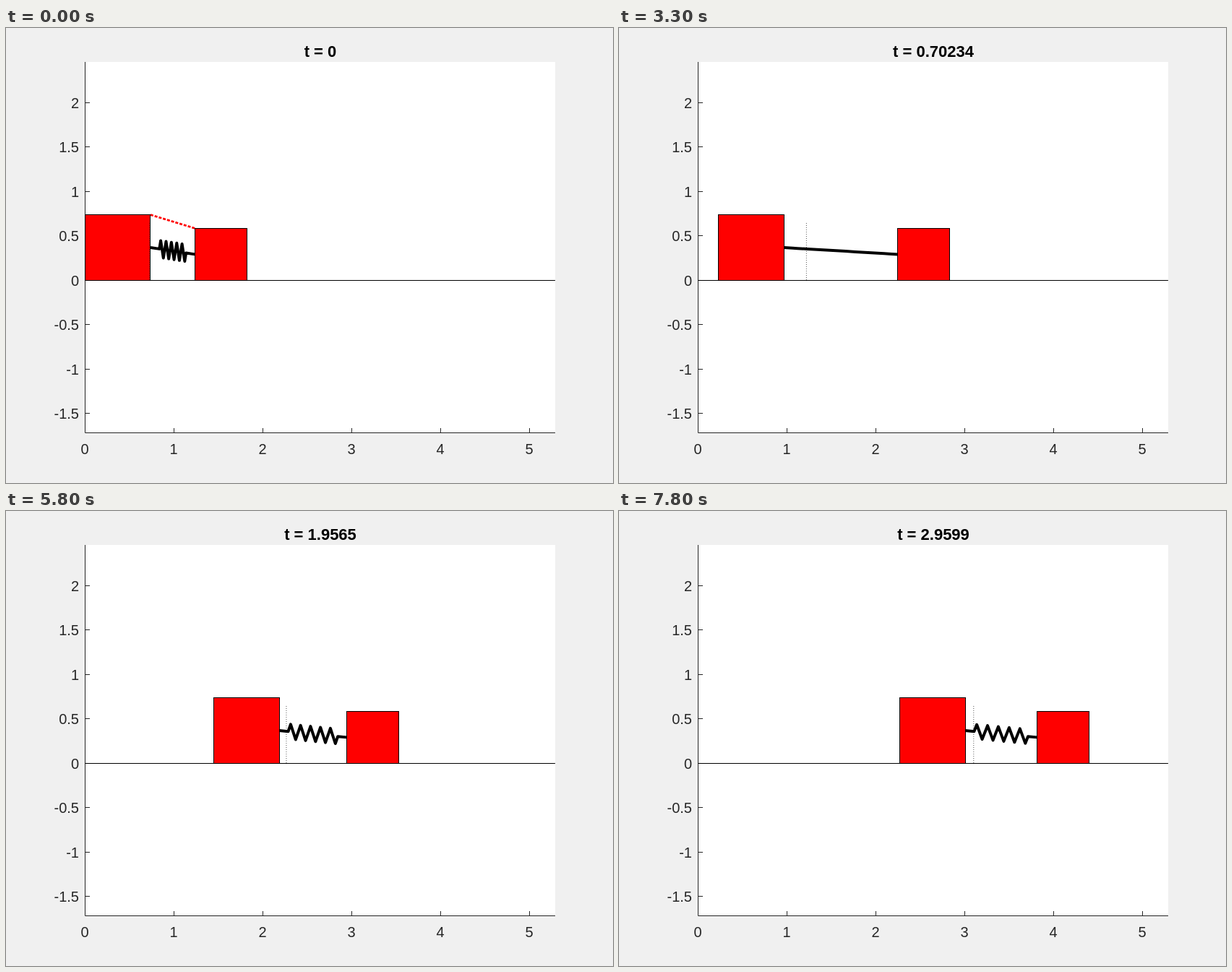
Recreate the animation shown at these times as an HTML page. Size 840 by 630 pixels, loop 7900 ms.

```html
<!DOCTYPE html>
<html lang="en">
<head>
<meta charset="utf-8">
<title>Two blocks and a spring</title>
<style>
  html, body { margin: 0; width: 100%; height: 100%; overflow: hidden; background: #f0f0f0; }
  svg { display: block; width: 840px; height: 630px; }
  text { font-family: "Liberation Sans", Arial, sans-serif; font-size: 20px; fill: #262626; }
  #title { font-size: 22px; font-weight: bold; fill: #000; text-anchor: middle; }
  .axis { stroke: #262626; fill: none; }
  .block { fill: #f00; stroke: #000; }
  #spring { fill: none; stroke: #000; stroke-width: 4; stroke-linejoin: round; }
  #thread { stroke: #f00; stroke-width: 2.7; stroke-dasharray: 4 2; }
  #center { stroke: #000; stroke-width: .67; stroke-dasharray: 1 2; }
</style>
</head>
<body>
<svg viewBox="0 0 840 630">
  <rect x="109" y="47" width="651" height="513.5" fill="#fff"/>
  <g id="axes"></g>
  <path class="axis" d="M109.5 47V560.5H760"/>
  <rect id="left" class="block"/>
  <rect id="right" class="block"/>
  <path d="M109 349.5H760" stroke="#000"/>
  <path id="spring"/>
  <path id="thread"/>
  <path id="center"/>
  <text id="title" x="435" y="40"></text>
</svg>
<script>
const SCALE = 123, LOOP = 7900, HOLD = 2000, STEP = 100;
const DT = 15 / 299;                       // simulated seconds per step
const M1 = 2, M2 = 1, K = 25, REST = 1, SQUEEZE = 0.5;
const W2 = 0.5857, W1 = W2 * Math.cbrt(M1 / M2);
const END = 0.1, COILS = 5, WIRE = 0.1;    // spring geometry

const $ = id => document.getElementById(id);
const px = u => 109.2 + u * SCALE;
const py = v => 349.4 - v * SCALE;
const snap = p => Math.floor(p) + 0.5;
const set = (el, attrs) => { for (const a in attrs) el.setAttribute(a, attrs[a]); };

function drawAxes() {
  let out = '';
  for (let u = 0; u <= 5; u++) {
    const x = snap(px(u));
    out += `<path class="axis" d="M${x} 560V554"/>` +
      `<text x="${x - 0.5}" y="590" text-anchor="middle">${u}</text>`;
  }
  for (let v = -1.5; v <= 2; v += 0.5) {
    const y = snap(py(v));
    out += `<path class="axis" d="M110 ${y}H116"/>` +
      `<text x="101" y="${y + 7.5}" text-anchor="end">${v}</text>`;
  }
  $('axes').innerHTML = out;
}

// The left block rests on the wall until the spring reaches its rest length.
function pose(t) {
  const w = Math.sqrt(K / M2), free = Math.PI / 2 / w;
  if (t < free) return { x: 0, gap: REST - SQUEEZE * Math.cos(w * t) };
  const wf = Math.sqrt(K * (M1 + M2) / (M1 * M2));
  const v = SQUEEZE * w, s = t - free;
  const stretch = v / wf * Math.sin(wf * s);
  return { x: M2 / (M1 + M2) * (v * s - stretch), gap: REST + stretch };
}

function springPath(x, gap) {
  const len = gap - 2 * END, n = 2 * COILS;
  const amp = Math.sqrt(Math.max(0, WIRE ** 2 - (len / n) ** 2));
  const at = (d, off) => {
    const y = W1 / 2 + (W2 - W1) / 2 * d / gap + off;
    return px(x + d).toFixed(2) + ' ' + py(y).toFixed(2);
  };
  const pts = [at(0, 0), at(END, 0)];
  for (let i = 0; i < n; i++)
    pts.push(at(END + len * (i + 0.5) / n, i % 2 ? -amp : amp));
  pts.push(at(gap - END, 0), at(gap, 0));
  return 'M' + pts.join('L');
}

function placeBlock(el, x, w) {
  const l = snap(px(x)), top = snap(py(w));
  set(el, { x: l, y: top, width: snap(px(x + w)) - l, height: 349.5 - top });
}

let shown = -1;
function draw(now) {
  const ms = now % LOOP;
  const step = ms < HOLD ? 0 : Math.floor((ms - HOLD) / STEP) + 1;
  if (step !== shown) {
    shown = step;
    const t = step * DT, { x, gap } = pose(t);
    const x1 = x + W1, x2 = x1 + gap;
    const mid = (M1 * (x + W1 / 2) + M2 * (x2 + W2 - W1 / 2)) / (M1 + M2);
    placeBlock($('left'), x, W1);
    placeBlock($('right'), x2, W2);
    set($('spring'), { d: springPath(x1, gap) });
    set($('center'), { d: `M${px(mid)} 349V${py((W1 + W2) / 2)}` });
    set($('thread'), {
      d: `M${px(x1)} ${py(W1)}L${px(x2)} ${py(W2)}`,
      visibility: step ? 'hidden' : 'visible'
    });
    $('title').textContent = 't = ' + Number(t.toPrecision(5));
  }
}

drawAxes();
const start = performance.now();
function tick() {
  draw(performance.now() - start);
  requestAnimationFrame(tick);
}
tick();
</script>
</body>
</html>
```
